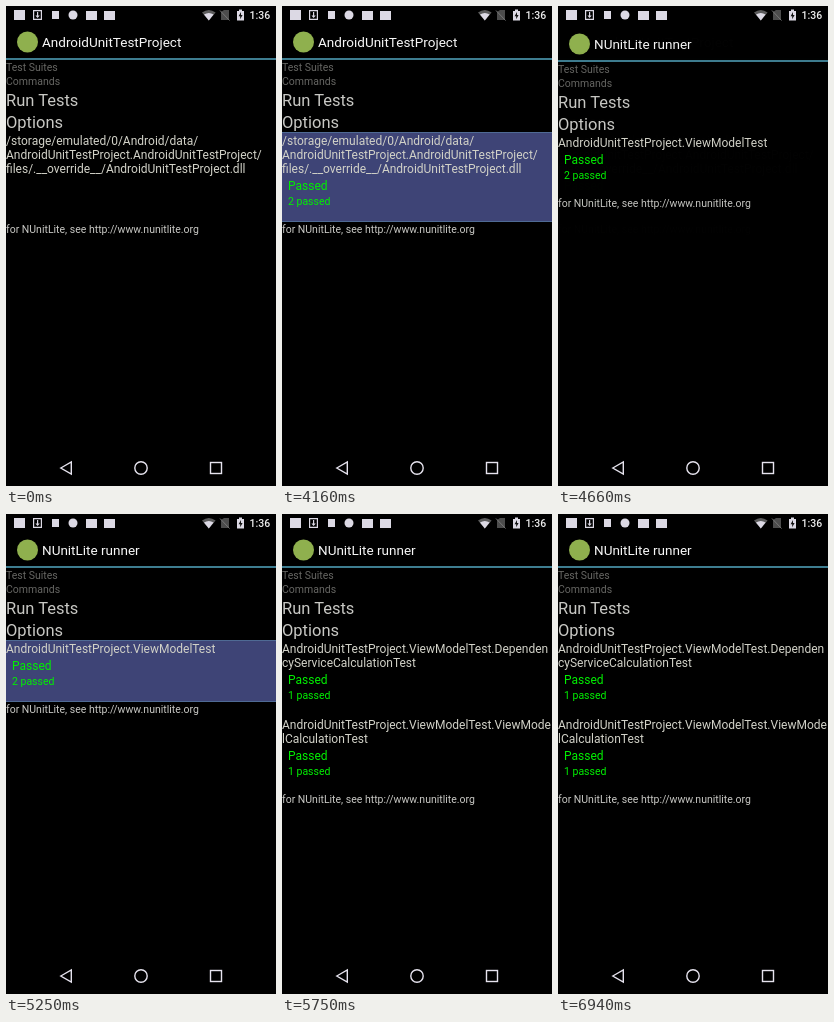
Write an HTML page that moves like this. It is 270x480 px and loops after 7.04 s.

```html
<!DOCTYPE html>
<html lang="en">
<head>
<meta charset="utf-8">
<title>Unit test runner</title>
<style>
  html, body { margin: 0; width: 100%; height: 100%; overflow: hidden; background: #000; }
  svg { display: block; width: 270px; height: 480px; font-family: Roboto, sans-serif; }
  text { fill: #c8c8c4; white-space: pre; }
  .title { font-size: 13.5px; fill: #f6f6f6; }
  .head { font-size: 10.5px; fill: #666663; }
  .large { font-size: 16.5px; }
  .item { font-size: 12px; fill: #d2d2c8; }
  .small { font-size: 10.5px; }
  .pass { fill: #00f000; }
  .press { fill: #3e4476; stroke: #4f6a94; }
</style>
</head>
<body>
<svg viewBox="0 0 270 480">
  <g id="pages"></g>

  <g id="status" fill="#dcd9e4">
    <rect x="8" y="4" width="11" height="10"/>
    <path fill-rule="evenodd" d="M27 4h9v10h-9zM28.2 5.2v7.6h6.6v-7.6zM31 6h1.2v3.5h1.6l-2.2 2.6-2.2-2.6h1.6z"/>
    <rect x="46" y="5" width="7" height="8"/>
    <circle cx="67" cy="9" r="4.5"/>
    <rect x="80" y="5" width="11" height="9"/>
    <rect x="98" y="5" width="11" height="9"/>
    <path fill="#5c5c5c" d="M196 6.5q6.8-5 13.6 0l-6.8 8z"/>
    <path d="M198 8.6q4.8-3 9.6 0l-4.8 5.9z"/>
    <path fill="#4c4c4c" d="M215 6l3-2h5v10h-8z"/>
    <path fill="none" stroke="#777" d="M214 4.5l9.5 10"/>
    <path d="M231 5h2v-1.5h3v1.5h2v9.5h-7z"/>
    <path fill="#111" d="M235 6l-2.4 4.2h1.6v3l2.4-4.2h-1.6z"/>
    <text x="243.5" y="13" font-size="10.5" font-weight="500" style="fill:#eee">1:36</text>
  </g>

  <g fill="none" stroke="#e6e3ee" stroke-width="1.4">
    <path d="M54.8 462L65.3 456V468Z"/>
    <circle cx="135" cy="462" r="6.2"/>
    <rect x="204.5" y="456.5" width="11" height="11"/>
  </g>
</svg>

<script>
const LOOP = 7040;
const STEP = 100;
const RESULT_AT = 2970;
const TOP = 139;

const label = (cls, x, y, s) => `<text class="${cls}" x="${x}" y="${y}">${s}</text>`;

function pageMarkup(title, items) {
  let y = TOP, list = '', press = '';
  for (const { lines, count } of items) {
    const top = y - 12.5;
    lines.forEach((line, i) => list += label('item', 0, y + 14 * i, line));
    y += 14 * (lines.length - 1) + 17;
    list += `<g class="result">${label('item pass', 6, y, 'Passed')}` +
            `${label('small pass', 6, y + 14.8, count + ' passed')}</g>`;
    y += 14.8;
    press ||= `<rect class="press" x="-1" y="${top}" width="272" height="${y + 16.7 - top}" opacity="0"/>`;
    y += 30;
  }
  // The status bar strip stays see-through while a page slides.
  return `<g class="page"><rect y="18" width="270" height="462"/>
    <rect y="52.2" width="270" height="1.6" fill="#4e9cb4"/>
    <circle cx="21.5" cy="36" r="10.5" fill="#8fb04e"/>
    ${label('title', 36, 41, title)}
    ${label('head', 0, 65.4, 'Test Suites')}${label('head', 0, 79.4, 'Commands')}
    ${label('large', 0, 100, 'Run Tests')}${label('large', 0, 122, 'Options')}
    ${press}${list}
    ${label('small', 0, y - 1.6, 'for NUnitLite, see http://www.nunitlite.org')}</g>`;
}

const root = document.getElementById('pages');
root.innerHTML =
  pageMarkup('AndroidUnitTestProject', [{
    lines: ['/storage/emulated/0/Android/data/',
            'AndroidUnitTestProject.AndroidUnitTestProject/',
            'files/.__override__/AndroidUnitTestProject.dll'], count: 2 }]) +
  pageMarkup('NUnitLite runner', [{
    lines: ['AndroidUnitTestProject.ViewModelTest'], count: 2 }]) +
  pageMarkup('NUnitLite runner', [
    { lines: ['AndroidUnitTestProject.ViewModelTest.Dependen', 'cyServiceCalculationTest'], count: 1 },
    { lines: ['AndroidUnitTestProject.ViewModelTest.ViewMode', 'lCalculationTest'], count: 1 }]);

const pages = [...root.children];
const result = pages[0].querySelector('.result');

// Each tap highlights a row, then the next page rises and fades in.
const taps = [{ at: 4160, open: 4504 }, { at: 5250, open: 5529 }];
const clamp = v => Math.min(1, Math.max(0, v));
const easeOut = (p, power) => 1 - (1 - clamp(p)) ** power;

function draw(t) {
  result.setAttribute('visibility', t < RESULT_AT ? 'hidden' : 'visible');
  taps.forEach(({ at, open }, i) => {
    const now = at + Math.floor((t - at) / STEP) * STEP;
    const glow = now < at ? 0 : clamp((250 - (now - at)) / 150);
    pages[i].querySelector('.press').setAttribute('opacity', glow);
    const next = pages[i + 1];
    const rise = Math.round(38.4 * (1 - easeOut((now - open) / 350, 5)));
    next.setAttribute('opacity', easeOut((now - open) / 200, 3));
    next.setAttribute('transform', `translate(0 ${rise})`);
  });
}

const start = performance.now();
function tick() {
  draw((performance.now() - start) % LOOP);
  requestAnimationFrame(tick);
}
tick();
</script>
</body>
</html>
```
